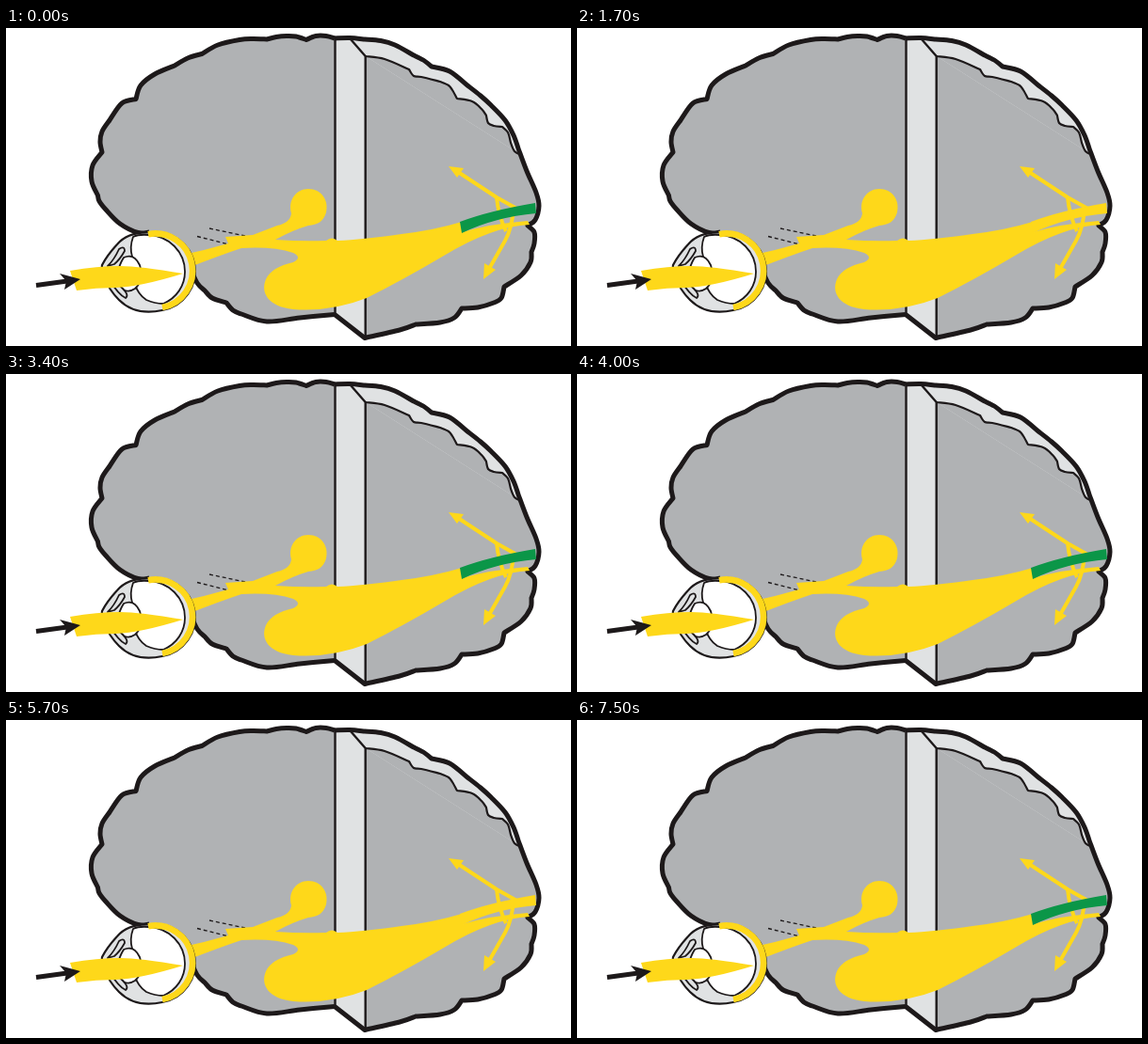
Write an HTML page with a canvas that moves like this. It is 600 by 338 pixels and loops after 7.6 s.

```html
<!DOCTYPE html>
<html lang="en">
<head>
<meta charset="utf-8">
<title>Visual pathway</title>
<style>
html, body { margin: 0; width: 100%; height: 100%; overflow: hidden; background: #fff; }
canvas { display: block; width: 600px; height: 338px; }
</style>
</head>
<body>
<canvas id="stage" width="600" height="338"></canvas>
<script>
const ctx = document.getElementById('stage').getContext('2d');
const LOOP = 7600, PERIOD = 4000, OFF_FROM = 1300, OFF_TO = 2300;
const INK = '#1d191a', GRAY = '#b0b2b4', PALE = '#e0e2e3', YELLOW = '#fed81a', GREEN = '#0b9648';

const fill = (d, color) => {
  ctx.fillStyle = color;
  ctx.fill(new Path2D(d));
};
const line = (d, color, width) => {
  ctx.strokeStyle = color;
  ctx.lineWidth = width;
  ctx.stroke(new Path2D(d));
};
const shape = (d, color, width) => {
  fill(d, color);
  line(d, INK, width);
};

// Smooth curve through "x,y" points; "/" marks a sharp corner.
function through(text) {
  const runs = text.split('/').map(run => run.trim().split(' ').map(p => p.split(',').map(Number)));
  let d = 'L' + runs[0][0];
  let last = null;
  for (const run of runs) {
    const pts = last ? [last, ...run] : run;
    for (let i = 0; i < pts.length - 1; i++) {
      const a = pts[Math.max(i - 1, 0)], b = pts[i], c = pts[i + 1], e = pts[Math.min(i + 2, pts.length - 1)];
      const c1 = b.map((v, k) => v + (c[k] - a[k]) / 6);
      const c2 = c.map((v, k) => v - (e[k] - b[k]) / 6);
      d += `C${c1} ${c2} ${c}`;
    }
    last = pts[pts.length - 1];
  }
  return d;
}
const open = d => 'M' + d.slice(1);

const topLeft = through('349,11 340,8.5 329,8.5 319,12.5 / 308,9 298,8.5 287,9.5 277,12 / 262,11.5 248,12.5 225,18 208,27.5 / ' +
  '193,32 179,40 / 158,49 143,61 138,75.5 / 123,80 110,98 / 102,110 100,121 102,132 / 92,146 91,163 97.5,178 / ' +
  '99,184 106,193 121,208 140,217.5 152,217');
const bottomLeft = through('195,254 203,271 211,279 / 219,287 234,292 / 241,300 250,304 277,312 312,308 349,304.5');
const topRight = through('349,11 365,10.5 381,12 / 398,13.5 413,18 433,29 / 443,34 452,41 / 471,46 490,61 / ' +
  '504,72 515,82 530,98 539,114 544,128 / 553,152 563,175 566,189 562,204 554,210');
const bottomRight = through('554,210 561,217 561,229 558,238 / 557,249 547,263 529,275 / 526,287 518,292 501,297 484,298 / ' +
  '476,308 461,313 435,315 / 418,321 381,329.5 / 349,304.5');
const innerEdge = through('382,30 402,33 428,44 / 433,51 441,52 461,57 / 470,61 474,66 479,75 / 495,78 505,86 510,93 / ' +
  '512,101 518,104 527,105 / 533,111 536,122 / 540,131 547,135');
const crust = through('349,11 365,10.5 381,12 / 398,13.5 413,18 433,29 / 443,34 452,41 / 471,46 490,61 / ' +
  '504,72 515,82 530,98 539,114 544,128 / 547,135');

const pathway = 'M188 241 Q212 236 236 229 L233 222 L262 220 L288 210 Q302 207 303 197 ' +
  'C299 182 309 171 321 171 C335 171 343 183 340 196 C337 206 331 209 321 210 ' +
  'Q304 215 286 225 Q314 227 340 226 Q346 221 352 226 Q378 225 420 219 Q454 215 484 206 ' +
  'L484 217 Q515 208 554 205 L556 209 Q516 211 465 242 Q421 268 383 287 ' +
  'Q345 302 305 299 C278 296 270 281 276 267 Q282 254 305 249 Q315 244 305 239 ' +
  'Q284 232 250 234 Q226 242 193 255 Z';
const strip = 'M482 206 Q514 194 562 186 L563 197 Q519 201 484 218 Z';
const beam = 'M68 258 Q97 253 121 253 Q142 253 188 261 Q143 275 116 276 Q96 276 75 279 Z';

function drawBrain() {
  fill(open(topLeft) + bottomLeft + 'Z', GRAY);
  fill(open(topRight) + bottomRight + 'Z', GRAY);
  fill(open(crust) + 'L547 135 L382 30 L366 13 Z', PALE);
  fill(open(innerEdge) + 'Z', GRAY);
  fill('M349 11 L366 13 L382 30 L382 329 L349 305 Z', PALE);
  line(open(innerEdge), INK, 2.2);
  line('M349.5 11 V305 M366 12 L381.7 30 V329', INK, 2.4);
  line(open(topLeft) + open(bottomLeft), INK, 5);
  line(open(topRight) + bottomRight, INK, 5);
}

function drawDashes() {
  ctx.setLineDash([4, 3]);
  line('M216 213 L254 221 M203 221.5 L236 230', INK, 1.3);
  ctx.setLineDash([]);
}

function drawArrows() {
  line('M546 194 L521 180 L480 153', YELLOW, 4);
  fill('M470 147 L486 149 L479 159 Z', YELLOW);
  line('M539 192 Q537 214 530 226 L513 256', YELLOW, 4);
  fill('M507 267 L508 250 L520 257 Z', YELLOW);
  line('M521 180 Q523 200 531 216', YELLOW, 4);
}

function drawEye() {
  shape('M152 217.5 C137 217 125 222 118 230 Q107 242 102 252 Q101 258 104 264 ' +
    'Q109 278 120 289 C132 301 148 304 166 300 A41 41 0 0 0 152 217.5 Z', PALE, 2.2);
  const chamber = 'M152 220 Q141 219 135 222 Q131 233 134 243 Q141 252 137 272 Q140 283 149 289 ' +
    'Q158 293 167 293 C181 287 190 274 190 259 C190 238 173 221 152 220 Z';
  shape(chamber, '#fff', 1.8);
  // lens, then iris above and below it
  shape('M125 244 Q136 239 142 252 Q147 268 137 277 Q128 283 121 275 Q115 260 125 244 Z', '#fff', 1.8);
  shape('M120 235 Q126 231 126 237 Q121 246 115 251 L108 253 Q115 246 120 235 Z', PALE, 1.8);
  shape('M110 268 Q118 271 124 277 Q131 284 127 287 Q120 284 110 268 Z', PALE, 1.8);
  line('M151 219.2 A39.5 39.5 0 0 1 166 297', YELLOW, 6.6);
  fill(beam, YELLOW);
}

function drawInput() {
  line('M32 273.5 L65 269', INK, 5);
  fill('M57 261 L79 267 L62 278 L64 269 Z', INK);
}

function draw(time) {
  const phase = time % LOOP % PERIOD;
  const off = phase >= OFF_FROM && phase < OFF_TO;
  ctx.fillStyle = '#fff';
  ctx.fillRect(0, 0, 600, 338);
  ctx.lineJoin = 'round';
  drawBrain();
  drawDashes();
  fill(pathway, YELLOW);
  drawArrows();
  fill(strip, off ? YELLOW : GREEN);
  drawEye();
  drawInput();
}

const start = performance.now();
function tick() {
  draw(performance.now() - start);
  requestAnimationFrame(tick);
}
tick();
</script>
</body>
</html>
```
